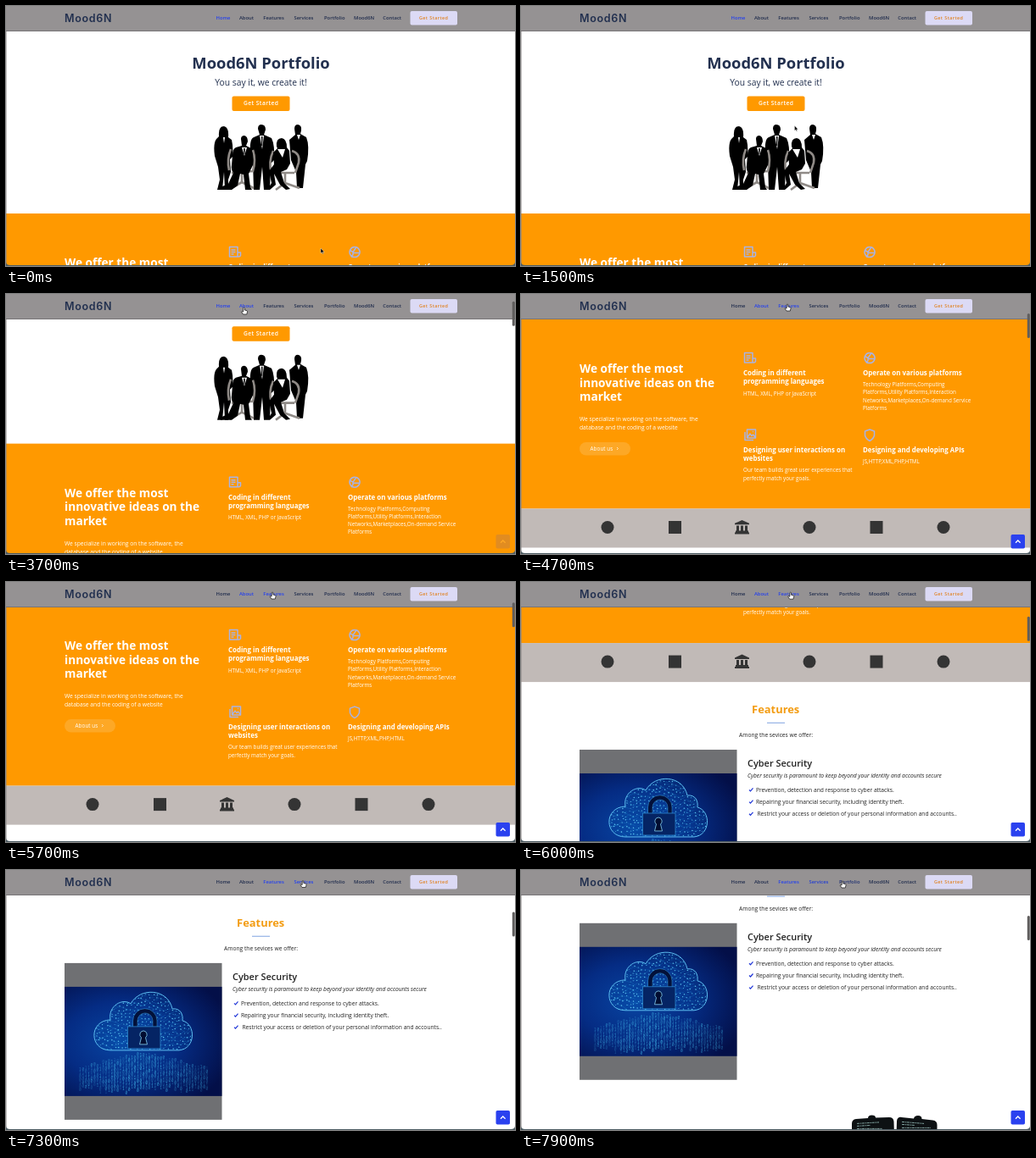
These frames come from a looping animation (600 by 307 pixels, 8 s). An HTML page:

```html
<!DOCTYPE html>
<html lang="en">
<head>
<meta charset="utf-8">
<title>Mood6N Portfolio</title>
<style>
html, body { margin: 0; width: 100%; height: 100%; overflow: hidden; background: #fff; }
svg { display: block; width: 600px; height: 307px; }
text { font: 6.68px "Open Sans", "Noto Sans", sans-serif; white-space: pre; }
.mid { text-anchor: middle; }
.title { font-size: 18.4px; font-weight: 700; fill: #22304f; }
.sub { font-size: 10.3px; fill: #22304f; }
.cta { font-weight: 600; letter-spacing: .42px; fill: #fff; }
.head { font-size: 13.65px; font-weight: 700; }
.item { font-size: 7.92px; font-weight: 700; }
.small { font-size: 6.27px; }
.section { font-size: 12.9px; font-weight: 700; fill: #f39c12; }
.topic { font-size: 10.95px; font-weight: 600; }
.note { font-style: italic; }
.icon { fill: none; stroke: #a9b3e4; stroke-width: 1.5; stroke-linejoin: round; }
.nav { font-size: 5.85px; font-weight: 600; }
.logo { font: 600 12.5px Inter, sans-serif; letter-spacing: .7px; fill: #22304f; }
.bits text { font: 4.6px "Noto Sans Mono", monospace; fill: #3fb4e6; }
.chair { fill: none; stroke: #8f8a86; stroke-width: 2.6; }
.shirt { fill: #fff; }
</style>
</head>
<body>
<svg viewBox="0 0 600 307">
  <defs>
    <radialGradient id="sea" cx=".36" cy=".5" r=".72">
      <stop offset="0" stop-color="#0845a2"/>
      <stop offset=".5" stop-color="#052c84"/>
      <stop offset="1" stop-color="#030f48"/>
    </radialGradient>
    <path id="cloud" d="M123 215C98 215 97 180 123 179C120 162 138 153 147 160C158 140 191 142 196 166C206 165 209 173 208 180C224 184 224 213 204 215Z"/>
    <clipPath id="inside"><use href="#cloud"/></clipPath>
  </defs>
  <rect width="600" height="307" fill="#fff"/>

  <g id="page">
    <text class="title mid" x="300.5" y="73.5">Mood6N Portfolio</text>
    <text class="sub mid" x="300.5" y="93.7">You say it, we create it!</text>
    <rect x="266.5" y="106.5" width="68" height="17.5" rx="2" fill="#ff9900"/>
    <text class="cta mid" x="300.7" y="117.3">Get Started</text>

    <g id="team">
      <path d="M251 154Q250 142 257 142Q263 143 262 155L266 158Q268 166 267 178L264 181L265 196L262 205V217H258L257 196L255 217H249L252 205L250 190L246 177Q244 162 248 157Z"/>
      <path d="M297 145Q297 140 301 140Q306 140 306 146L304 152L313 156Q317 164 316 182L312 186L311 217H304L302 190L299 217H292L291 184L288 172Q287 157 292 155L299 152Z"/>
      <path d="M340 145Q340 140 344 140Q349 141 348 147L347 151L354 155Q358 165 355 183L353 187L350 215H343L342 196L336 182L334 158L341 152Z"/>
      <g class="chair">
        <path d="M265 169Q260 181 263 194M291 170Q295 182 291 195L266 197M278 196V209M264 216L278 208L292 215"/>
        <path d="M315 171Q309 184 313 197L340 197M337 171Q347 174 345 185L341 197M329 198V210M318 217L329 209L346 215"/>
      </g>
      <path d="M277 157Q277 153 281 153Q285 154 285 160L283 165L289 168Q292 176 291 188L288 194L286 198L288 214L290 217H282L280 199L276 198L273 212L266 217H253V214L262 210L268 197Q265 194 266 188L267 176Q267 169 271 167L278 165Z"/>
      <path d="M319 166Q318 156 325 156Q331 157 331 167L334 171L335 186L331 193L324 196L328 209L335 216L330 217L323 211L316 198L318 211L311 217L310 214L313 209L310 195L316 187L315 173L320 168Z"/>
      <path class="shirt" d="M278 167L284 167L281 177ZM299 153L304 153L302 169ZM343 152L347 152L345 158ZM320 169L329 169L326 179ZM256 155L258 155L257 162Z"/>
      <path d="M280 168H282L281.5 175H280.5ZM301 154H302.5L302.3 165H301.2Z"/>
    </g>

    <g transform="translate(0 215)">
      <rect y="30" width="600" height="223.5" fill="#ff9900"/>
      <g fill="#fff">
        <text class="head" x="69" y="93">We offer the most</text>
        <text class="head" x="69" y="109.5">innovative ideas on the</text>
        <text class="head" x="69" y="126">market</text>
        <text x="69" y="150">We specialize in working on the software, the</text>
        <text x="69" y="160">database and the coding of a website</text>
        <rect x="69" y="175" width="60" height="15.5" rx="7.75" fill="#fda826"/>
        <text class="small" x="81.5" y="184.8" letter-spacing=".1">About us</text>
        <path d="M113 181l1.5 1.5l-1.5 1.5" fill="none" stroke="#fff" stroke-width=".7"/>
        <text class="item" x="262" y="96">Coding in different</text>
        <text class="item" x="262" y="106">programming languages</text>
        <text class="small" x="262" y="119.5">HTML, XML, PHP or JavaScript</text>
        <text class="item" x="403" y="96">Operate on various platforms</text>
        <text class="small" x="403" y="109">Technology Platforms,Computing</text>
        <text class="small" x="403" y="118.3">Platforms,Utility Platforms,Interaction</text>
        <text class="small" x="403" y="127.6">Networks,Marketplaces,On-demand Service</text>
        <text class="small" x="403" y="136.8">Platforms</text>
        <text class="item" x="262" y="187">Designing user interactions on</text>
        <text class="item" x="262" y="197">websites</text>
        <text class="small" x="262" y="210.3">Our team builds great user experiences that</text>
        <text class="small" x="262" y="219.6">perfectly match your goals.</text>
        <text class="item" x="403" y="187">Designing and developing APIs</text>
        <text class="small" x="403" y="200">JS,HTTP,XML,PHP,HTML</text>
      </g>
      <g class="icon">
        <path d="M263.5 69.5h9.5v11.5h-9.5zM273 76h3.5v3.5q-.5 1.5-2 1.5h-2M265.5 73h5M265.5 75.5h5M265.5 78h3"/>
        <path d="M411 69.5a6 6 0 1 0 .1 0M409 75.5l-3.5-2M409 75.5v3l-2 3M409 75.5l3.500-5M409 76.500h8"/>
        <path d="M266.5 160h10v10h-10zM264 163v9.5h10M267 169l3-4l2 2.5l1.5-1.5l2.5 3M273 162.5h1"/>
        <path d="M411 160l5.5 2v5q-1 4-5.5 6.5q-4.5-2.500-5.500-6.500v-5z"/>
      </g>
      <rect y="253.5" width="600" height="46" fill="#c1bab7"/>
      <g fill="#343434">
        <circle cx="102" cy="275.5" r="7.5"/>
        <rect x="174" y="268" width="15" height="15"/>
        <path d="M260.5 267l8.5 3.8v1.5h-17v-1.5zM254 273.5h3v6h2v-6h3v6h2v-6h3v6h1v2h1v2h-17v-2h1v-2h1z"/>
        <circle cx="340" cy="275.5" r="7.5"/>
        <rect x="411.5" y="268" width="15" height="15"/>
        <circle cx="498" cy="275.5" r="7.5"/>
      </g>
    </g>

    <g transform="translate(0 482.4)" fill="#222">
      <text class="section mid" x="300.2" y="69.5">Features</text>
      <rect x="290" y="79.8" width="21" height="1.2" fill="#96b4e6"/>
      <text class="mid" x="300.5" y="97">Among the sevices we offer:</text>
      <rect x="69" y="112" width="185.5" height="185" fill="#6f7073"/>
      <rect x="69" y="140" width="185.5" height="129" fill="url(#sea)"/>
      <g id="mesh" clip-path="url(#inside)" stroke="#1f86d0" stroke-width=".25"></g>
      <use href="#cloud" fill="#1687dc" fill-opacity=".08" stroke="#5cbcf0" stroke-width="1"/>
      <path d="M152.5 189V180a11.500 11.500 0 0 1 23 0V189" fill="none" stroke="#03113a" stroke-width="5"/>
      <path d="M149.5 188V180a14 14 0 0 1 28.5 0V188M155 188V180a9 9 0 0 1 18 0V188" fill="none" stroke="#3a97d4" stroke-width=".5"/>
      <rect x="143.5" y="187" width="38.5" height="26" fill="#052464" stroke="#2c87cf" stroke-width=".8"/>
      <path d="M162 192a4.5 4.5 0 0 1 2.5 8l2 8h-9l2-8a4.5 4.5 0 0 1 2.5-8z" fill="#020d30" stroke="#8ad4f5" stroke-width=".8"/>
      <g id="bits" class="bits"></g>
      <text class="topic" x="267" y="132">Cyber Security</text>
      <text class="note" x="267" y="145.5">Cyber security is paramount to keep beyond your identity and accounts secure</text>
      <text x="277" y="162.2">Prevention, detection and response to cyber attacks.</text>
      <text x="277" y="176.4">Repairing your financial security, including identity theft.</text>
      <text x="278.5" y="190.5">Restrict your access or deletion of your personal information and accounts..</text>
      <path d="M269 159.5l1.5 1.5l3-3.5M269 173.7l1.5 1.5l3-3.5M269 187.8l1.5 1.5l3-3.5" fill="none" stroke="#2036d8" stroke-width="1.2"/>
    </g>

    <g transform="translate(0 532)">
      <path d="M390 330V299q0-5 5-5.500l14-1q0-3.500 4.500-3.500t4.500 3l16-.5q5 0 5.500 5l1 33.500zM442 330l1-34q.5-5 5.500-4.500l14.500 1.500q.5-3.500 5-3.500t4.500 4l13 1.500q5 .5 5 5.500v30z" fill="#0d1113"/>
      <path d="M396 299l26-1.500M396 302l16-1M396 305h30M449 297l26 2M449 300l15 1M449 304h34" stroke="#8fb5b0" stroke-width=".9" stroke-dasharray="3 .8 1.5 .6"/>
    </g>
  </g>

  <rect y="30" width=".5" height="277" fill="#8b8787"/>
  <rect width="600" height="29.5" fill="#959293"/>
  <rect y="29" width="600" height="1" fill="#777476"/>
  <text class="logo" x="69" y="18.6">Mood6N</text>
  <g id="nav"></g>
  <rect x="476.5" y="6" width="55.5" height="16.5" rx="2" fill="#dcdaf5"/>
  <text class="cta mid" x="504.2" y="16.2" style="font-size:5.43px;fill:#e0811f">Get Started</text>

  <g id="top">
    <rect x="577.5" y="284" width="16.5" height="16.5" rx="1.8" fill="#2a41ef"/>
    <path d="M583 293.8l2.8-2.8l2.8 2.8" fill="none" stroke="#fff" stroke-width="1.3"/>
  </g>
  <rect id="thumb" x="596.8" width="3" height="29" rx="1.5" fill="#5f5d5d"/>
  <path d="M0 302Q0 306 5 306H595Q600 306 600 302V307H0Z" fill="#4d5c63"/>
  <path id="arrow" d="M0 0V6L1.4 4.8L2.3 6.8L3.2 6.4L2.3 4.5H4.2Z" stroke="#fff" stroke-width=".4"/>
  <path id="hand" d="M-.8 .5Q0-.5 .8 .5V3L3.5 3.7Q4.2 4 4 5L3.3 8H-1L-3 5Q-2.5 4-1.3 5L-.8 5Z" fill="#fff" stroke="#111" stroke-width=".7"/>
</svg>
<script>
const LOOP = 8000, BLUE = [38, 66, 236], DARK = [34, 46, 78];
const $ = id => document.getElementById(id);
const clamp = v => Math.max(0, Math.min(1, v));
const smooth = v => v * v * (3 - 2 * v);

function add(parent, tag, attrs, text = "") {
  const el = document.createElementNS("http://www.w3.org/2000/svg", tag);
  for (const k in attrs) el.setAttribute(k, attrs[k]);
  el.textContent = text;
  parent.append(el);
}

let seed = 7;
const rand = () => (seed = seed * 16807 % 2147483647) / 2147483647;

// Dotted mesh inside the cloud
for (let y = 148; y < 216; y += 4.5)
  for (let x = 100; x < 222; x += 4.5) {
    const px = x + rand() * 3, py = y + rand() * 3;
    add($("mesh"), "path", { d: `M${px} ${py}l5 ${rand() * 8 - 4}` });
    add($("mesh"), "circle", { cx: px, cy: py, r: .45 + rand() * .35, fill: "#62c8f0", stroke: "none" });
  }

// Binary rain below the cloud
for (let x = 86; x < 236; x += 3.4) {
  const edge = Math.abs(x - 161) / 75;
  for (let y = 219 + edge * 18 + rand() * 4; y < 268 - rand() * 9; y += 3.9)
    add($("bits"), "text", { x, y, opacity: (.35 + rand() * .65) * (1 - edge * .4) }, rand() < .5 ? "0" : "1");
}

// Menu: label, x, hover start, hover end
const links = [
  ["Home", 247.5], ["About", 275, 2400, 3950], ["Features", 303.3, 4150, 6200],
  ["Services", 339.5, 6550, 7850], ["Portfolio", 375, 7830, 9000],
  ["Mood6N", 410], ["Contact", 444.3]
].map(([label, x, from = Infinity, to = Infinity]) => {
  add($("nav"), "text", { class: "nav", x, y: 16.3 }, label);
  return { from, to, el: $("nav").lastChild };
});

// Scroll jumps: start time, distance
const jumps = [[3000, 215], [5205, 269.5], [7368, 700]];
const expo = p => p <= 0 ? 0 : p >= 1 ? 1 :
  p < .5 ? 2 ** (20 * p - 10) / 2 : 1 - 2 ** (10 - 20 * p) / 2;
const scrollAt = t => jumps.reduce((s, [start, dist]) => s + dist * expo((t - start) / 1500), 0);

// Pointer stops: time, x, y
const stops = [[0, 371, 286], [400, 371, 286], [2500, 280.5, 16], [3700, 280.5, 16], [4400, 314, 12],
  [5850, 314, 12], [6400, 334, 13], [6750, 350, 12.5], [7400, 350, 12.5], [7900, 379, 13], [LOOP, 379, 13]];

function pointerAt(t) {
  const i = stops.findIndex(s => s[0] > t);
  const [a, b] = [stops[i - 1], stops[i]];
  const p = smooth((t - a[0]) / (b[0] - a[0]));
  return [a[1] + (b[1] - a[1]) * p, a[2] + (b[2] - a[2]) * p];
}

function draw(t) {
  const s = scrollAt(t);
  $("page").setAttribute("transform", `translate(0 ${-s})`);
  $("thumb").setAttribute("y", 2 + s * .098);
  $("thumb").setAttribute("opacity", clamp((t - 3000) / 200));
  $("top").setAttribute("opacity", clamp((t - 3646) / 400));

  const active = s > 431 ? 2 : s > 162 ? 1 : 0;
  links.forEach(({ from, to, el }, i) => {
    const mix = i === active ? 1 : clamp((t - from) / 300) * (1 - clamp((t - to) / 300));
    el.setAttribute("fill", `rgb(${DARK.map((d, k) => d + (BLUE[k] - d) * mix)})`);
  });

  const over = links.some(l => t >= l.from && t < l.to);
  const at = `translate(${pointerAt(t)})`;
  for (const [id, on] of [["arrow", !over], ["hand", over]]) {
    $(id).setAttribute("transform", at);
    $(id).setAttribute("visibility", on ? "visible" : "hidden");
  }
}

const begin = performance.now();
function tick() {
  draw((performance.now() - begin) % LOOP);
  requestAnimationFrame(tick);
}
tick();
</script>
</body>
</html>
```
